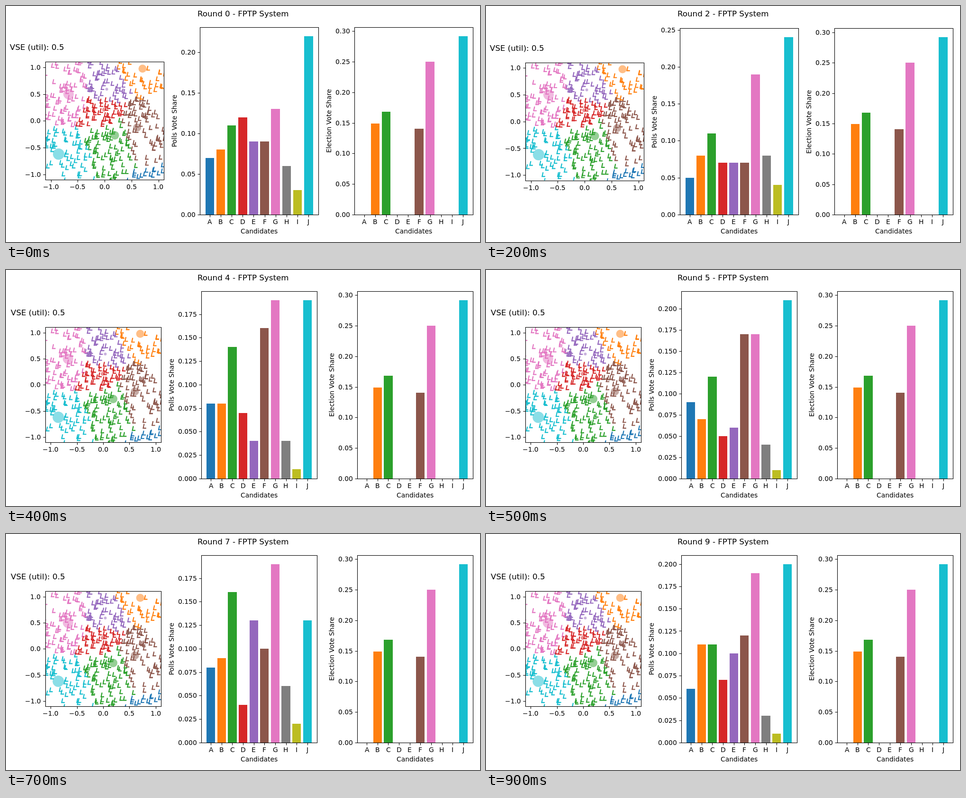
An HTML page with a canvas that plays this animation: 1000 by 500 pixels, repeating every 1 s.

```html
<!DOCTYPE html>
<html lang="en">
<head>
<meta charset="utf-8">
<title>Vote rounds</title>
<style>
html, body { margin: 0; width: 100%; height: 100%; overflow: hidden; background: #fff; }
canvas { display: block; }
</style>
</head>
<body>
<canvas id="stage" width="1000" height="500"></canvas>
<script>
const ctx = document.getElementById('stage').getContext('2d');
const COLORS = ['#1f77b4', '#ff7f0e', '#2ca02c', '#d62728', '#9467bd',
  '#8c564b', '#e377c2', '#7f7f7f', '#bcbd22', '#17becf'];
const LETTERS = 'ABCDEFGHIJ';
const BOTTOM = 441.82;
const ROUND_MS = 100, ROUNDS = 10;

// Poll shares in percent by round; a missing round is the mean of its neighbours
const POLLS = {
  0: [7, 8, 11, 12, 9, 9, 13, 6, 3, 22],
  2: [5, 8, 11, 7, 7, 7, 19, 8, 4, 24],
  3: [8, 13, 12, 7, 7, 11, 16, 3, 4, 19],
  4: [8, 8, 14, 7, 4, 16, 19, 4, 1, 19],
  6: [11, 6, 10, 3, 8, 18, 15, 5, 1, 23],
  7: [8, 9, 16, 4, 13, 10, 19, 6, 2, 13],
  9: [6, 11, 11, 7, 10, 12, 19, 3, 1, 20]
};
const ELECTION = [0, 0.149, 0.168, 0, 0, 0.1402, 0.25, 0, 0, 0.292];

// Position and disc radius; the first stands outside the plot
const CANDIDATES = [
  { color: 0, x: 0.95, y: -1.55, r: 0 },
  { color: 1, x: 0.705, y: 0.975, r: 8.5 },
  { color: 2, x: 0.19, y: -0.27, r: 9 },
  { color: 3, x: -0.01, y: 0.21, r: 4 },
  { color: 4, x: 0.04, y: 0.59, r: 3 },
  { color: 5, x: 0.605, y: -0.125, r: 8.5 },
  { color: 6, x: -0.67, y: 0.5, r: 11 },
  { color: 9, x: -0.855, y: -0.62, r: 12 }
];

function pollShares(round) {
  const row = POLLS[round] ||
    POLLS[round - 1].map((v, i) => Math.floor((v + POLLS[round + 1][i]) / 2));
  return row.map(v => v / 100);
}

function makeRandom(seed) {
  return () => (seed = seed * 16807 % 2147483647) / 2147483647;
}

function nearest(x, y) {
  const dist = c => Math.hypot(x - c.x, y - c.y);
  return CANDIDATES.reduce((a, b) => dist(b) < dist(a) ? b : a).color;
}

// Voters spread over the square, thinning out away from the middle
function makeVoters(count) {
  const rand = makeRandom(4217), voters = [];
  while (voters.length < count) {
    const x = (rand() * 2 - 1) * 1.12, y = (rand() * 2 - 1) * 1.12;
    if (rand() > Math.exp(-0.55 * (x * x + y * y))) continue;
    voters.push({ x, y, color: COLORS[nearest(x, y)] });
  }
  return voters;
}
const VOTERS = makeVoters(430);

const snap = v => Math.round(v) + 0.5;

// Text starts on a whole pixel; align is 0 for left, 0.5 centre, 1 right
function label(str, x, y, align = 0.5, size = 13.89) {
  ctx.font = `${size}px "DejaVu Sans", sans-serif`;
  ctx.fillStyle = '#000';
  const start = x - ctx.measureText(str).width * align;
  ctx.fillText(str, Math.round(start), Math.round(y));
}

function line(x1, y1, x2, y2) {
  ctx.beginPath();
  ctx.moveTo(x1, y1);
  ctx.lineTo(x2, y2);
  ctx.stroke();
}

function frameBox(x, y, w, h) {
  ctx.strokeStyle = '#000';
  ctx.lineWidth = 1.1;
  ctx.strokeRect(snap(x), snap(y), snap(x + w) - snap(x), snap(y + h) - snap(y));
}

function xTick(str, x, y) {
  line(snap(x), snap(y), snap(x), snap(y) + 5);
  label(str, x, y + 20.3);
}

function yTick(str, x, y) {
  line(snap(x) - 5, snap(y), snap(x), snap(y));
  label(str, x - 9.7, y + 5.1, 1);
}

function drawVoter(x, y, color) {
  ctx.strokeStyle = color;
  ctx.beginPath();
  ctx.moveTo(x - 0.6, y - 5);
  ctx.lineTo(x - 2.6, y + 4);
  ctx.lineTo(x + 3.8, y + 4);
  ctx.stroke();
}

function drawMap(size, mid) {
  const left = 83.15, top = mid - size / 2, unit = size / 2.2;
  const px = x => left + size / 2 + x * unit;
  const py = y => mid - y * unit;
  ctx.save();
  ctx.beginPath();
  ctx.rect(left, top, size, size);
  ctx.clip();
  ctx.lineWidth = 2.2;
  for (const v of VOTERS) drawVoter(px(v.x), py(v.y), v.color);
  ctx.globalAlpha = 0.5;
  for (const c of CANDIDATES) {
    ctx.fillStyle = COLORS[c.color];
    ctx.beginPath();
    ctx.arc(px(c.x), py(c.y), c.r, 0, 2 * Math.PI);
    ctx.fill();
  }
  ctx.restore();
  frameBox(left, top, size, size);
  for (let v = -1; v <= 1; v += 0.5) {
    const str = v.toFixed(1).replace('-', '\u2212');
    xTick(str, px(v), top + size);
    yTick(str, left, py(v));
  }
  label('VSE (util): 0.5', 8 + (249.7 - size) / 3, Math.round(top) - 25, 0, 16.67);
}

function drawBars(left, width, top, shares, step, title) {
  const limit = Math.max(...shares) * 1.05;
  const unit = width / 10.78, digits = step < 0.05 ? 3 : 2;
  const px = i => left + (i + 0.89) * unit;
  const py = v => BOTTOM - v / limit * (BOTTOM - top);
  shares.forEach((v, i) => {
    if (!v) return;
    const x1 = Math.round(px(i - 0.4)), x2 = Math.round(px(i + 0.4)), y = Math.round(py(v));
    ctx.fillStyle = COLORS[i];
    ctx.fillRect(x1, y, x2 - x1, Math.round(BOTTOM) - y);
  });
  frameBox(left, top, width, BOTTOM - top);
  shares.forEach((v, i) => xTick(LETTERS[i], px(i), BOTTOM));
  for (let k = 0; k * step <= limit; k++) yTick((k * step).toFixed(digits), left, py(k * step));
  label('Candidates', left + width / 2, 482);
  ctx.save();
  ctx.translate(Math.round(left - (digits === 3 ? 58 : 49)), Math.round((top + BOTTOM) / 2));
  ctx.rotate(-Math.PI / 2);
  label(title, 0, 0);
  ctx.restore();
}

function draw(round) {
  const polls = pollShares(round);
  const limit = Math.max(...polls) * 1.05;
  const step = limit > 0.225 ? 0.05 : 0.025;
  // Longer tick labels narrow the plots; one at the upper edge pushes them down
  const width = step === 0.05 ? 249.7 : 243.7;
  const top = limit % step < limit * 0.01 ? 47.48 : 44.8;

  ctx.fillStyle = '#fff';
  ctx.fillRect(0, 0, 1000, 500);
  label(`Round ${round} - FPTP System`, 500, 22, 0.5, 16.67);
  drawMap(width, (top + BOTTOM) / 2);
  drawBars(534 - width / 2, width, top, polls, step, 'Polls Vote Share');
  drawBars(984.85 - width, width, top, ELECTION, 0.05, 'Election Vote Share');
}

const start = performance.now();
function tick() {
  const t = performance.now() - start;
  draw(Math.floor(t / ROUND_MS) % ROUNDS);
  requestAnimationFrame(tick);
}
tick();
</script>
</body>
</html>
```
